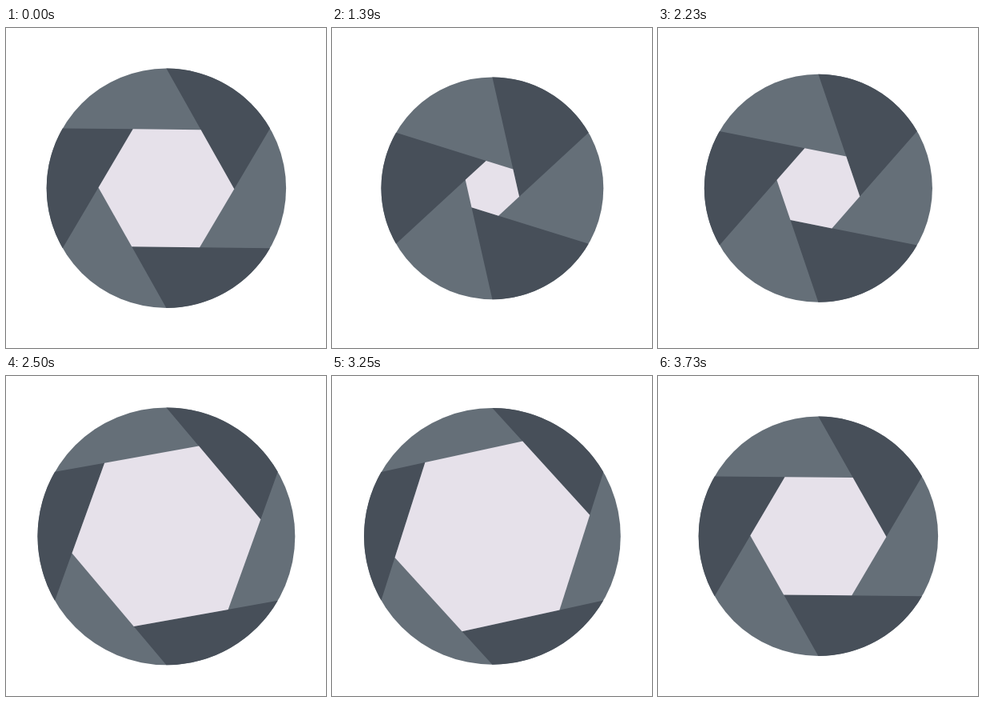
These frames come from a looping animation (400x400 px, 3760 ms). An HTML page:

```html
<!DOCTYPE html>
<html lang="en">
<head>
<meta charset="utf-8">
<title>Iris shutter</title>
<style>
  html, body { margin: 0; width: 100%; height: 100%; overflow: hidden; background: #fff; }
  svg { display: block; width: 100%; height: 100%; }
</style>
</head>
<body>
<svg viewBox="-200.4 -200.3 400 400">
  <circle id="disc" fill="#656f78"/>
  <path id="blades" fill="#474f59"/>
  <polygon id="opening" fill="#e6e1ea"/>
</svg>
<script>
const LOOP = 3760;
const RAD = Math.PI / 180;

// Each leg: start ms, end ms, value reached at the end.
const radiusTrack = { from: 149.7, legs: [[1000, 1400, 138.9], [2108, 2632, 165], [3085, 3540, 149.7]] };
const tiltTrack = { from: 29.4, legs: [[1000, 1430, 12.3], [2068, 2640, 45], [3070, 3760, 29.4]] };

const disc = document.getElementById('disc');
const blades = document.getElementById('blades');
const opening = document.getElementById('opening');

function valueAt({ from, legs }, time) {
  let value = from;
  for (const [start, end, to] of legs) {
    const p = Math.min(1, Math.max(0, (time - start) / (end - start)));
    value += (to - value) * p * p * (3 - 2 * p);
  }
  return value;
}

// Point on the stage, turned clockwise by a number of sixths.
function turned(x, y, sixths) {
  const c = Math.cos(sixths * 60 * RAD), s = Math.sin(sixths * 60 * RAD);
  return `${(x * c - y * s).toFixed(3)},${(x * s + y * c).toFixed(3)}`;
}

function draw(time) {
  const r = valueAt(radiusTrack, time);
  const tilt = valueAt(tiltTrack, time) * RAD;
  // Length of a blade edge, from the rim to the next blade's edge.
  const edge = r * (Math.cos(tilt) + Math.sin(tilt) / Math.sqrt(3));
  const tipX = edge * Math.sin(tilt);
  const tipY = edge * Math.cos(tilt) - r;

  disc.setAttribute('r', r);
  blades.setAttribute('d', [0, 2, 4].map(k =>
    `M${turned(0, -r, k)}L${turned(tipX, tipY, k)}L${turned(0, -r, k + 1)}` +
    `A${r},${r} 0 0 0 ${turned(0, -r, k)}Z`).join(''));
  opening.setAttribute('points',
    [0, 1, 2, 3, 4, 5].map(k => turned(tipX, tipY, k)).join(' '));
}

const began = performance.now();
function tick() {
  draw((performance.now() - began) % LOOP);
  requestAnimationFrame(tick);
}
tick();
</script>
</body>
</html>
```
